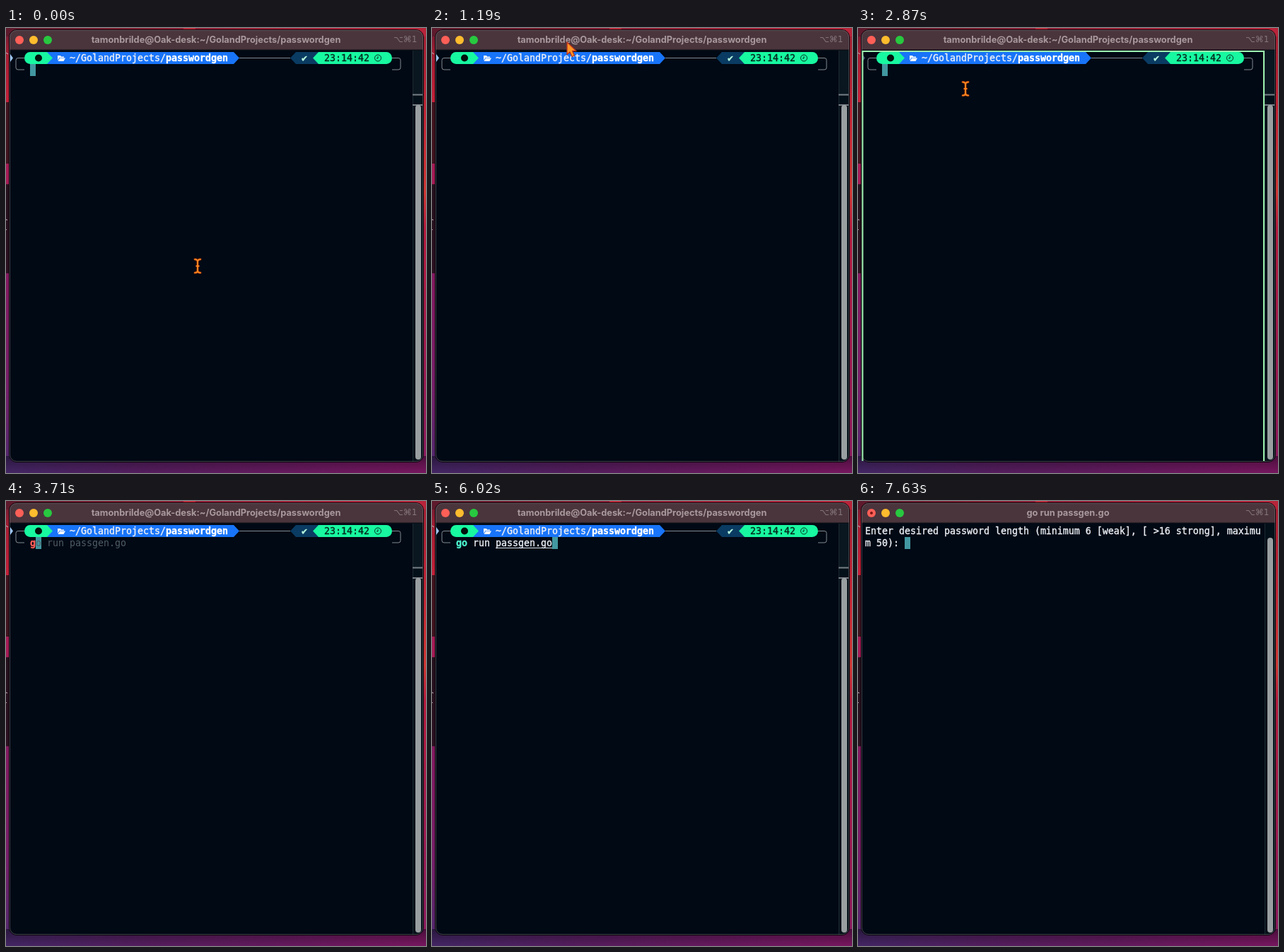
These frames come from a looping animation (594 by 630 pixels, 8000 ms). An HTML page:

```html
<!DOCTYPE html>
<html lang="en">
<head>
<meta charset="utf-8">
<title>Terminal session</title>
<style>
  html, body { margin: 0; width: 100%; height: 100%; overflow: hidden; background: #000914; }
  svg { display: block; width: 594px; height: 630px; }
  text { white-space: pre; }
  .mono { font: 13.29px "DejaVu Sans Mono", monospace; color: #eef0f5; }
  .mono, .mono tspan { fill: currentColor; stroke: currentColor; stroke-width: .35px; }
  .bold { font-weight: 700; color: #fff; }
  .title { font: 700 12.8px Inter, sans-serif; fill: #a8999d; text-anchor: middle; }
  .mono .hint { color: #4f5d66; stroke-width: 0; }
  .cmd { color: #4cf3cf; font-weight: 700; }
  .bad { color: #ff5f5a; font-weight: 700; }
  .under { color: #0c2630; }
  .time { color: #06281e; }
  .check { color: #b9fbe0; }
  .frame { fill: none; stroke: #828a90; }

  /* 1% of the loop is 80 ms */
  .a { animation: 8s step-end infinite; }
  .idle { animation-name: idle; }
  .busy { animation-name: busy; }
  .prompt { animation-name: prompt; }
  .output { animation-name: output; }
  .one { animation-name: one; }
  .two { animation-name: two; }
  .three { animation-name: three; }
  .full { animation-name: full; }
  .outline { animation-name: outline; }
  .mark { animation-name: mark; }
  .caret { animation-name: blink, step; }
  .beam { animation-name: beam; }
  .arrow { animation-name: arrow; }
  .pointer { animation: move 8s ease-in-out infinite; }

  @keyframes idle { 0% { opacity: 1 } 90.125%, to { opacity: 0 } }
  @keyframes busy { 0% { opacity: 0 } 90.125%, to { opacity: 1 } }
  @keyframes prompt { 0% { opacity: 1 } 94.5%, to { opacity: 0 } }
  @keyframes output { 0% { opacity: 0 } 94.5%, to { opacity: 1 } }
  @keyframes one { 0% { opacity: 0 } 45.5% { opacity: 1 } 49.875%, to { opacity: 0 } }
  @keyframes two { 0% { opacity: 0 } 49.875% { opacity: 1 } 56%, to { opacity: 0 } }
  @keyframes three { 0% { opacity: 0 } 56% { opacity: 1 } 75.25%, to { opacity: 0 } }
  @keyframes full { 0% { opacity: 0 } 75.25% { opacity: 1 } 94.5%, to { opacity: 0 } }
  @keyframes outline { 0% { opacity: 0 } 25.375% { opacity: 1 } 41.125%, to { opacity: 0 } }
  @keyframes mark { 0% { opacity: 1 } 25.375% { opacity: .45 } 41.125%, to { opacity: 1 } }
  @keyframes blink {
    0%, 7.875%, 20.125%, 32.375%, 44.625%, 75.25%, to { opacity: 1 }
    1.75%, 14%, 26.25%, 38.5%, 71.75% { opacity: 0 }
  }
  @keyframes step {
    0% { transform: translate(34px, 51px) }
    45.5% { transform: translate(42px, 51px) }
    49.875% { transform: translate(50px, 51px) }
    56% { transform: translate(58px, 51px) }
    75.25% { transform: translate(170px, 51px) }
    90.125% { transform: translate(10px, 68px) }
    94.5%, to { transform: translate(66px, 51px) }
  }
  @keyframes beam { 0% { opacity: 1 } 13.5% { opacity: 0 } 17.5% { opacity: 1 } 45.5%, to { opacity: 0 } }
  @keyframes arrow { 0% { opacity: 0 } 13.5% { opacity: 1 } 17.5%, to { opacity: 0 } }
  @keyframes move {
    0%, .875% { transform: translate(271px, 337px); animation-timing-function: ease-in }
    8.75% { transform: translate(228px, 136px); animation-timing-function: ease-out }
    14%, 15.75% { transform: translate(191px, 20px) }
    21.875% { transform: translate(151px, 85px) }
    25.375%, to { transform: translate(152px, 86px) }
  }
</style>
</head>
<body>
<svg viewBox="0 0 594 630">
  <defs>
    <linearGradient id="top">
      <stop offset="0" stop-color="#5d1a2c"/>
      <stop offset=".45" stop-color="#8c1d33"/>
      <stop offset="1" stop-color="#b8243a"/>
    </linearGradient>
    <linearGradient id="left" x2="0" y2="1">
      <stop offset="0" stop-color="#661a30"/>
      <stop offset=".06" stop-color="#a51d33"/>
      <stop offset=".166" stop-color="#c31f38"/>
      <stop offset=".167" stop-color="#40131f"/>
      <stop offset=".304" stop-color="#40131f"/>
      <stop offset=".305" stop-color="#a31b55"/>
      <stop offset=".35" stop-color="#a31b55"/>
      <stop offset=".352" stop-color="#24101d"/>
      <stop offset=".55" stop-color="#2b1020"/>
      <stop offset=".552" stop-color="#82195f"/>
      <stop offset=".8" stop-color="#761e68"/>
      <stop offset="1" stop-color="#4b286d"/>
    </linearGradient>
    <linearGradient id="right" x2="0" y2="1">
      <stop offset="0" stop-color="#a32135"/>
      <stop offset=".2" stop-color="#c52637"/>
      <stop offset=".37" stop-color="#d13a36"/>
      <stop offset=".45" stop-color="#b61d40"/>
      <stop offset="1" stop-color="#8a1c62"/>
    </linearGradient>
    <linearGradient id="bottom">
      <stop offset="0" stop-color="#4b2a70"/>
      <stop offset=".35" stop-color="#5f2068"/>
      <stop offset="1" stop-color="#85196a"/>
    </linearGradient>
    <linearGradient id="shade" x2="0" y2="1">
      <stop offset="0" stop-color="#000" stop-opacity=".45"/>
      <stop offset="1" stop-color="#000" stop-opacity=".1"/>
    </linearGradient>
    <clipPath id="win"><rect x="5" y="3" width="585" height="611" rx="10"/></clipPath>
    <path id="ibeam" d="M-4-9.500q4 0 4 3.500q0-3.500 4-3.500M-4 9.500q4 0 4-3.500q0 3.500 4 3.500M0-6V6M-1.500 0h3"/>
  </defs>

  <!-- desktop -->
  <rect width="594" height="630" fill="url(#left)"/>
  <rect x="300" width="294" height="630" fill="url(#right)"/>
  <rect width="594" height="12" fill="url(#top)"/>
  <rect x="251" width="17" height="2" fill="#b92a3a"/>
  <rect y="606" width="594" height="24" fill="url(#bottom)"/>
  <rect y="606" width="594" height="24" fill="url(#shade)"/>
  <path d="M0 35l3 2M0 271l2 1M0 285l1 1" stroke="#c7b6c2"/>

  <!-- window -->
  <rect x="4.500" y="2.500" width="586" height="612" rx="10.500" fill="none" stroke="#0a0509"/>
  <g clip-path="url(#win)">
    <rect x="5" y="3" width="585" height="611" fill="#000914"/>
    <rect x="5" y="3" width="585" height="28" fill="#4a353c"/>
    <rect x="5" y="30.500" width="585" height="1" fill="#15141b"/>
    <rect x="575" y="32" width="15" height="582" fill="#041019"/>
    <rect x="575" y="32" width="1" height="582" fill="#1d2932"/>
  </g>
  <rect x="5.500" y="3.500" width="584" height="610" rx="9.500" fill="none" stroke="#7c777d" stroke-opacity=".5"/>

  <circle cx="19" cy="17" r="6" fill="#ff5f57"/>
  <circle cx="39" cy="17" r="6" fill="#febc2e"/>
  <circle cx="59" cy="17" r="6" fill="#28c840"/>
  <text x="548" y="20" font-family="DejaVu Sans, sans-serif" font-size="12" fill="#83747a">⌥⌘1</text>

  <text class="title a idle" x="297" y="21">tamonbrilde@Oak-desk:~/GolandProjects/passwordgen</text>
  <g class="a busy">
    <circle cx="19" cy="17" r="2" fill="#7d1512"/>
    <text class="title" x="297" y="21">go run passgen.go</text>
  </g>

  <!-- prompt -->
  <g class="a prompt">
    <rect x="576" y="32" width="13" height="62" fill="#0a1720"/>
    <path d="M575 94.500h14M575 109h14" stroke="#788086" stroke-width="2"/>
    <rect x="579" y="109" width="8" height="502" rx="4" fill="#999ea1"/>

    <path class="a mark" d="M6 37l4 5.500-4 5.500z" fill="#9cc5f3"/>
    <path class="frame" d="M26 42.500H17q-3 0-3 3V56q0 3 3 3h9M330 42.500h72M546 42.500h9q3 0 3 3V56q0 3-3 3h-9"/>
    <path d="M56 34h266l8 8.500-8 8.500H56z" fill="#1874f8"/>
    <path d="M34 34H58l8 8.500-8 8.500H34a8 8.500 0 0 1 0-17z" fill="#17f8a0"/>
    <circle cx="46" cy="42.500" r="5" fill="#02120d"/>
    <path d="M73 39h4l1 1.500h4V42h-6.500L73 46zM73.500 47l2.500-4.500h8L81.500 47z" fill="#f2f6fc"/>
    <text class="mono" x="90" y="47">~/GolandProjects/<tspan class="bold">passwordgen</tspan></text>

    <path d="M410 34h32v17h-32l-8-8.500z" fill="#0a3b62"/>
    <path d="M442 34h96a8 8.500 0 0 1 0 17h-96l-8-8.500z" fill="#17f8a0"/>
    <text class="mono check" x="418" y="47">✔</text>
    <text class="mono time" x="450" y="47">23:14:42</text>
    <path d="M526 40V43h-2M530.500 42.500a4.500 4.500 0 1 1-9 0a4.500 4.500 0 1 1 9 0" fill="none" stroke="#06281e"/>
  </g>

  <path class="a outline" d="M6.500 613V33h567.500v580" fill="none" stroke="#9cf0ae" stroke-width="2"/>

  <!-- output -->
  <g class="a output">
    <rect x="579" y="52" width="8" height="559" rx="4" fill="#999ea1"/>
    <text class="mono" x="10" y="47">Enter desired password length (minimum 6 [weak], [ &gt;16 strong], maximu</text>
    <text class="mono" x="10" y="64">m 50): </text>
  </g>

  <!-- command line -->
  <rect class="a caret" width="8" height="17" fill="#4297a0"/>
  <text class="mono a one" x="34" y="64"><tspan class="bad">g</tspan><tspan class="hint">o run passgen.go</tspan></text>
  <text class="mono a two" x="34" y="64"><tspan class="cmd">go</tspan><tspan class="hint"> run passgen.go</tspan></text>
  <text class="mono a three" x="34" y="64"><tspan class="cmd">go</tspan> <tspan class="under">r</tspan><tspan class="hint">un passgen.go</tspan></text>
  <g class="a full">
    <text class="mono" x="34" y="64"><tspan class="cmd">go</tspan> run passgen.go</text>
    <path d="M90 66.500h80" stroke="#dfe3ea"/>
  </g>

  <!-- pointer -->
  <g class="pointer">
    <g class="a beam" fill="none" stroke-linecap="round">
      <use href="#ibeam" stroke="#5c1d08" stroke-width="3.500"/>
      <use href="#ibeam" stroke="#ff8420" stroke-width="2"/>
    </g>
    <path class="a arrow" d="M0 0v17.500l4-3.500 3 6.500 3.500-1.500-3-6.500h5.500z" fill="#ff9426" stroke="#b8331c" stroke-width="1.300" stroke-linejoin="round"/>
  </g>
</svg>
</body>
</html>
```
